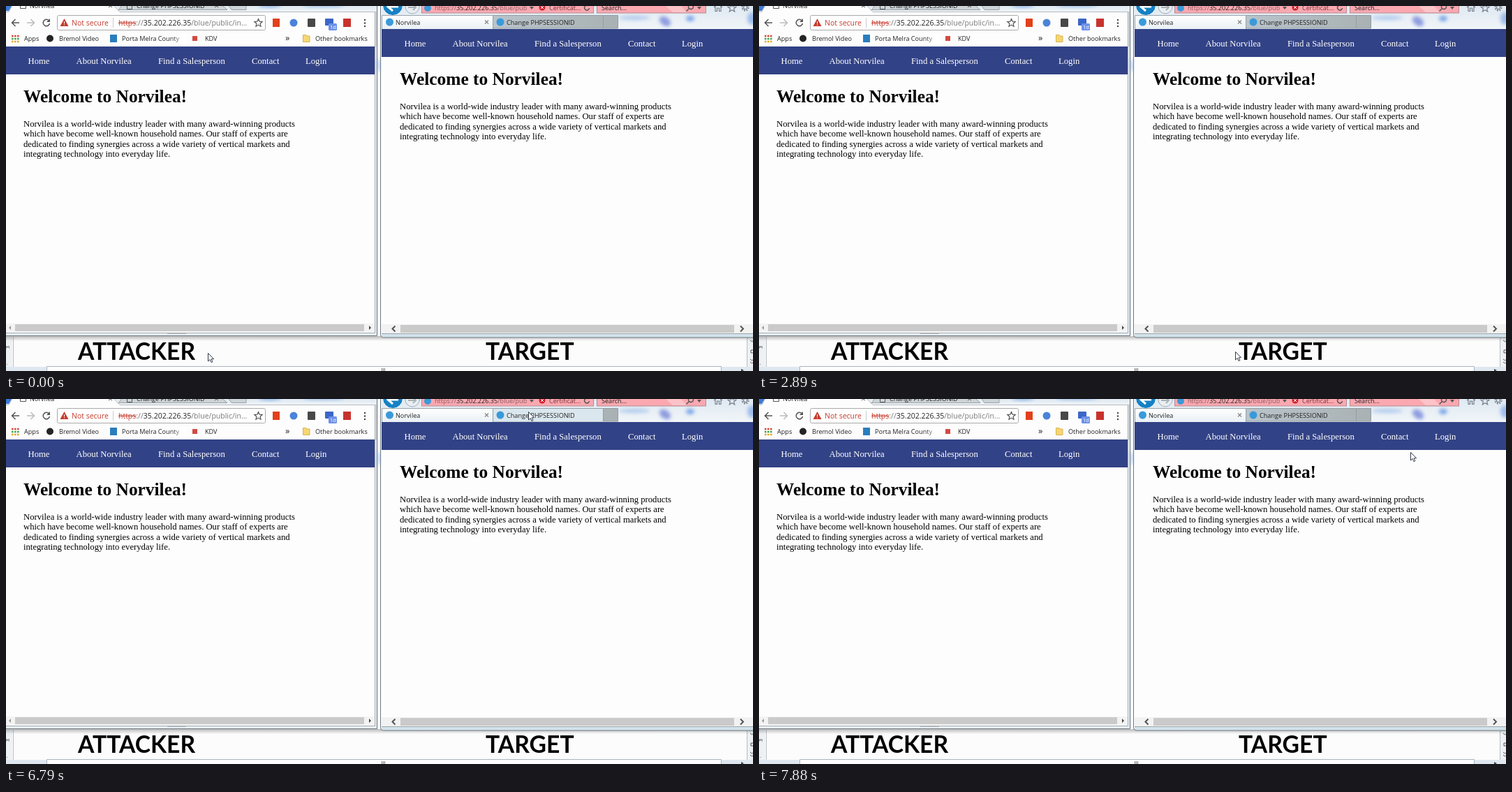
Recreate the animation shown at these times as an HTML page. Size 1070 by 523 pixels, loop 8 s.

```html
<!DOCTYPE html>
<html lang="en">
<head>
<meta charset="utf-8">
<title>Two browsers</title>
<style>
html, body { margin: 0; width: 100%; height: 100%; overflow: hidden; background: #fdfdfd; }
svg { display: block; width: 1070px; height: 523px; }
text { white-space: pre; }
.ui { font: 9.1px "Open Sans", "Noto Sans", sans-serif; fill: #222; }
.url { font-size: 10.5px; }
.page { font: 12.68px "Liberation Serif", "Noto Serif", serif; fill: #000; }
.page .nav { fill: #fff; }
.page .title { font-size: 25.4px; font-weight: bold; }
.label { font: bold 33.7px Lato, "Open Sans", sans-serif; fill: #000; }
.line { fill: none; stroke: #555; stroke-width: 1.5; }
.edge { fill: none; }
.bar { fill: #324286; }

#pointer, #arrow, #beam, #tip, #hover { animation: 8s step-end infinite; }
#pointer { animation-name: move; }
#arrow { animation-name: arrow; }
#beam { animation-name: beam; }
#tip { animation-name: tip; }
#hover { animation-name: hover; }

@keyframes move {
  0% { transform: translate(289px, 497px); }
  9.375% { transform: translate(288px, 497px); }
  13.25% { transform: translate(288px, 496px); }
  17% { transform: translate(322px, 494px); }
  18.625% { transform: translate(361px, 492px); }
  20.5% { transform: translate(414px, 489px); }
  22% { transform: translate(471px, 494px); }
  23.875% { transform: translate(545px, 502px); }
  25.375% { transform: translate(615px, 504px); }
  27% { transform: translate(665px, 499px); }
  28.875% { transform: translate(670px, 496px); }
  30.875% { transform: translate(674px, 494px); }
  32.75% { transform: translate(678px, 494px); }
  34.25% { transform: translate(681px, 494px); }
  36.125% { transform: translate(682px, 495px); }
  67.375% { transform: translate(681px, 488px); }
  69.125% { transform: translate(689px, 440px); }
  70.75% { transform: translate(703px, 368px); }
  72.625% { transform: translate(713px, 292px); }
  74.125% { transform: translate(721px, 215px); }
  75.625% { transform: translate(729px, 151px); }
  77.625% { transform: translate(739px, 113px); }
  79.5% { transform: translate(746px, 72px); }
  81.5% { transform: translate(749px, 50px); }
  83% { transform: translate(750px, 30px); }
  84.875% { transform: translate(748px, 18px); }
  88.625% { transform: translate(730px, 18px); }
  90.125% { transform: translate(675px, 21px); }
  91.625% { transform: translate(641px, 42px); }
  93.5% { transform: translate(685px, 76px); }
  95.125% { transform: translate(770px, 94px); }
  96.625% { transform: translate(869px, 83px); }
  98.5%, 100% { transform: translate(933px, 76px); }
}
@keyframes arrow { 0%, 79.5%, 100% { opacity: 1; } 75.625% { opacity: 0; } }
@keyframes beam { 0%, 79.5%, 100% { opacity: 0; } 75.625% { opacity: 1; } }
@keyframes hover { 0%, 90.125%, 100% { opacity: 0; } 84.875% { opacity: 1; } }
@keyframes tip {
  0%, 93.5%, 100% { opacity: 0; }
  88.625%, 90.125% { opacity: 1; }
  91.625% { opacity: .5; }
}
</style>
</head>
<body>
<svg viewBox="0 0 1070 523">
  <defs>
    <linearGradient id="glass" x2="0" y2="1">
      <stop offset="0" stop-color="#dfe9f2"/><stop offset="1" stop-color="#f1f5f8"/>
    </linearGradient>
    <linearGradient id="tab" x2="0" y2="1">
      <stop offset="0" stop-color="#fff"/><stop offset="1" stop-color="#e9f0f5"/>
    </linearGradient>
    <linearGradient id="dim">
      <stop offset="0" stop-color="#b9c4cb"/><stop offset="1" stop-color="#a9b1b3"/>
    </linearGradient>
    <linearGradient id="shade" x2="0" y2="1">
      <stop offset="0" stop-color="#555" stop-opacity=".4"/><stop offset="1" stop-color="#555" stop-opacity="0"/>
    </linearGradient>
    <linearGradient id="fade">
      <stop offset="0" stop-color="#fff" stop-opacity="0"/><stop offset="1" stop-color="#fff"/>
    </linearGradient>
    <filter id="soft" x="-50%" y="-50%" width="200%" height="200%"><feGaussianBlur stdDeviation="2.5"/></filter>
    <clipPath id="stage"><rect width="1070" height="523"/></clipPath>
    <g id="page" class="page">
      <g class="nav">
        <text x="31.5" y="83">Home</text>
        <text x="100.5" y="83">About Norvilea</text>
        <text x="218" y="83">Find a Salesperson</text>
        <text x="352" y="83">Contact</text>
        <text x="429" y="83">Login</text>
      </g>
      <text class="title" x="25" y="138">Welcome to Norvilea!</text>
      <text x="25" y="173">Norvilea is a world-wide industry leader with many award-winning products</text>
      <text x="25" y="187.3">which have become well-known household names. Our staff of experts are</text>
      <text x="25" y="201.6">dedicated to finding synergies across a wide variety of vertical markets and</text>
      <text x="25" y="216">integrating technology into everyday life.</text>
    </g>
  </defs>

  <g clip-path="url(#stage)">
  <!-- document behind the windows -->
  <rect width="1070" height="523" fill="#fcfcfc"/>
  <path fill="#eef1f4" d="M0 474H9V523H0ZM1062 474H1070V523H1062Z"/>
  <path class="edge" stroke="#b8bcc2" d="M10.500 474V517M1061.500 474V517"/>
  <rect y="473" width="1070" height="7" fill="url(#shade)"/>
  <g class="ui" style="font-size:7px"><text transform="translate(5 491) rotate(-90)">3</text><text x="1" y="516">·</text></g>
  <path class="line" style="stroke-width:1" d="M1066 479l2.500 2 2.500-2M1066 506l2.500 2 2.500-2M1066 510l2.500 2 2.500-2M1067 493h4v4h-4Z"/>
  <rect y="517" width="1070" height="6" fill="#dfe8f0"/>
  <path fill="#fdfdfd" stroke="#aab4bf" d="M58.500 524V516.500H1024.500V524"/>
  <path class="edge" stroke="#777" d="M538.500 519v4M540.500 519v4M542.500 519v4"/>
  <path fill="#444" d="M1053 520l4 2-4 2Z"/>
  <text class="label" x="103" y="507">ATTACKER</text>
  <text class="label" x="687" y="507">TARGET</text>

  <!-- left window -->
  <rect width="533" height="472" fill="#e6edf3"/>
  <rect width="530" height="9" fill="url(#glass)"/>
  <g filter="url(#soft)" fill="#8cb3e8"><ellipse cx="378" cy="-1" rx="16" ry="3"/><ellipse cx="455" cy="-1" rx="30" ry="2"/></g>
  <path fill="#cdd3d6" stroke="#9aa3a8" d="M160 7.500L168 -4H306L317 5.500H160M318 -2L323 5.500H344V-2Z"/>
  <path fill="#fdfdfd" stroke="#b5bbc0" d="M-2 8.500H4L10 -3H152L163 8.500H530V58H-2Z"/>
  <path fill="#3d7ad8" d="M0 0H8L4 7H0Z"/>
  <path class="line" style="stroke-width:1" d="M20.500 -3V3.500H28.500V-3M173.500 -3V4.500H180.500V-3M147 -2l5 4M152 -2l-5 4M299 -2l5 4M304 -2l-5 4"/>
  <text class="ui" x="34" y="2.500">Norvilea</text>
  <text class="ui" x="187" y="2.500">Change PHPSESSIONID</text>

  <rect y="9" width="528" height="460" fill="#fdfdfd"/>
  <path class="line" d="M19 24H8.500M13.500 19L8.500 24l5 5"/>
  <path class="line" style="stroke:#bbb" d="M30 24H40.500M35.500 19l5 5-5 5"/>
  <path class="line" d="M61.500 21A4.700 4.700 0 1 0 62.500 25"/><path fill="#555" d="M63 18v5h-5Z"/>
  <rect x="73.500" y="13.500" width="298" height="21" rx="2" fill="#fff" stroke="#aaa"/>
  <path fill="#c53b2d" d="M83.500 18L89.500 29H77.500Z"/><path class="edge" stroke="#fff" d="M83.500 22v3.500M83.500 26.500v1.200"/>
  <text class="ui url" x="94" y="28" style="fill:#c53b2d">Not secure</text>
  <path class="edge" stroke="#ccc" d="M153.500 17V31"/>
  <text class="ui url" x="161" y="28" style="fill:#777"><tspan fill="#c53b2d" text-decoration="line-through">https</tspan>://<tspan fill="#222">35.202.226.35</tspan>/blue/public/in...</text>
  <path class="line" style="stroke-width:1.200" d="M361.500 18.500l1.600 3.700 4 .3-3 2.700.9 4-3.500-2.100-3.500 2.100.9-4-3-2.700 4-.3Z"/>
  <rect x="382" y="18" width="10" height="12" fill="#e2401b"/>
  <circle cx="412" cy="24" r="5.500" fill="#4a83d8"/>
  <rect x="432" y="18" width="11" height="12" rx="1" fill="#484848"/>
  <rect x="457" y="18" width="12" height="10" rx="1" fill="#3b66c9"/>
  <rect x="462" y="25" width="12" height="10" rx="1.500" fill="#6d91ea"/>
  <text class="ui" x="464" y="32.500" style="font-size:7.500px;fill:#fff">1d</text>
  <rect x="483" y="18" width="11" height="12" fill="#c8322d"/>
  <g fill="#444"><circle cx="514" cy="20" r="1.200"/><circle cx="514" cy="24.500" r="1.200"/><circle cx="514" cy="29" r="1.200"/></g>

  <g class="edge" stroke-width="2.600" stroke-dasharray="2.600 1.400">
    <path stroke="#d94a38" d="M8 43H19"/><path stroke="#48a352" d="M8 47H19"/><path stroke="#e5a92e" d="M8 51H19"/>
  </g>
  <circle cx="63" cy="46.500" r="5" fill="#242424"/>
  <rect x="149" y="41" width="10" height="11" fill="#2a7dbd"/>
  <rect x="267" y="43" width="7" height="7" fill="#d14b43"/>
  <path fill="#f5d673" stroke="#d9b452" d="M425.500 41.500H430l1 1.500h4V51.500H425.500Z"/>
  <g class="ui">
    <text x="26" y="50">Apps</text>
    <text x="76" y="50">Bremol Video</text>
    <text x="166" y="50">Porta Melra County</text>
    <text x="285" y="50">KDV</text>
    <text x="400" y="50" style="font-size:13px">»</text>
    <text x="443" y="50">Other bookmarks</text>
  </g>
  <rect x="238" y="40" width="20" height="14" fill="url(#fade)"/>
  <rect class="bar" y="58" width="528" height="40"/>
  <rect y="455" width="528" height="12" fill="#f3f3f3"/>
  <rect x="13" y="456" width="500" height="10" fill="#cacaca"/>
  <path fill="#999" d="M7 458v6l-3-3Z"/><path fill="#444" d="M520 458v6l3-3Z"/>
  <path class="edge" stroke="#a6aeb5" d="M0 468.500H528.500V9"/>
  <path class="edge" stroke="#737b82" d="M0 472.500H531.500V0"/>
  <path class="edge" stroke="#bbb" d="M231 469.500H258"/>

  <!-- right window -->
  <path fill="#d3e2eb" stroke="#6f7a82" d="M536.500 -1V471q0 4 4 4H1071V-1Z"/>
  <path class="edge" stroke="#f8fbfd" d="M537.500 0V472"/>
  <rect x="538" width="532" height="33" fill="url(#glass)"/>
  <g filter="url(#soft)" fill="#7da7e8">
    <ellipse cx="944" cy="22" rx="9" ry="6" transform="rotate(35 944 22)" fill="#8f9de0"/>
    <ellipse cx="980" cy="18" rx="6" ry="4"/>
    <ellipse cx="900" cy="17" rx="22" ry="3" opacity=".5"/>
    <ellipse cx="1068" cy="18" rx="6" ry="9" opacity=".7"/>
    <ellipse cx="534" cy="85" rx="2" ry="10" opacity=".6"/>
  </g>
  <circle cx="554" cy="-1" r="14.500" fill="#1681c4" stroke="#fff"/>
  <path fill="none" stroke="#fff" stroke-width="3" d="M562 1H548M554 -6L547 1l7 6"/>
  <circle cx="582" cy="1" r="10" fill="#e9eef2" stroke="#a4adb5"/>
  <path fill="none" stroke="#a9b1b8" stroke-width="2" d="M576 2H587M583 -2l4 4-4 4"/>
  <rect x="595.500" y="-5" width="246" height="15" fill="#fba8b0" stroke="#b58a92"/>
  <rect x="846.500" y="-5" width="156" height="15" fill="#fba8b0" stroke="#b58a92"/>
  <path fill="#fcc3c8" d="M945 0H967L975 9H955Z"/>
  <circle cx="604" cy="3" r="5" fill="#3a9ad9"/>
  <g class="ui">
    <text x="614" y="6" style="fill:#8a5a60">https://<tspan fill="#222">35.202.226.35</tspan>/blue/pub</text>
    <text x="778" y="6" style="fill:#7c3038">Certificat...</text>
    <text x="853" y="6">Search...</text>
  </g>
  <path fill="#555" d="M750 1h6l-3 4ZM990 1h6l-3 4Z"/>
  <circle cx="768" cy="2" r="4.500" fill="#d3222d"/><path class="edge" stroke="#fff" d="M766 0l4 4M770 0l-4 4"/>
  <path class="line" d="M834.500 0A3.500 3.500 0 1 0 835.500 3M978 4l-3.500 3.500"/>
  <circle class="line" cx="981" cy="1" r="3.500"/>
  <g class="line" style="stroke:#77818b;stroke-width:1.200">
    <path d="M1014 2L1020 -3l6 5M1016 1V7.500H1018.500V3H1021.500V7.500H1024V1M1040 -3l1.500 4 4.500.3-3.500 2.700 1.200 4-3.700-2.300-3.700 2.300 1.200-4-3.500-2.700 4.500-.3Z"/>
    <circle cx="1059" cy="2" r="4.500" stroke-dasharray="2 1.500" stroke-width="2"/><circle cx="1059" cy="2" r="2.500"/>
  </g>
  <path fill="url(#dim)" stroke="#929ca4" d="M697.500 32V13.500H855.500V32ZM855.500 32V13.500H876.500V32Z"/>
  <rect id="hover" x="698" y="14" width="157" height="18" fill="#dbe7ee"/>
  <path fill="url(#tab)" stroke="#98a3ab" d="M538.500 33V13.500H697.500V33"/>
  <circle cx="549.500" cy="23" r="5.500" fill="#3a9ad9"/><circle cx="708" cy="23" r="5.500" fill="#3a9ad9"/>
  <text class="ui" x="558" y="27">Norvilea</text>
  <text class="ui" x="717" y="27">Change PHPSESSIONID</text>
  <path class="edge" stroke="#888" stroke-width="1.300" d="M686 20.500l5 5M691 20.500l-5 5"/>

  <rect x="538" y="33" width="532" height="437" fill="#fdfdfd"/>
  <rect class="bar" x="538" y="33" width="532" height="40"/>
  <g id="tip">
    <rect x="743" y="40" width="293" height="26" fill="#1d2958" opacity=".45"/>
    <rect x="740.500" y="37.500" width="292" height="26" fill="#46538c" stroke="#2b3769"/>
    <g class="ui" style="fill:#28335f">
      <text x="744" y="47">Change PHPSESSIONID</text>
      <text x="744" y="59">https://35.202.226.35/blue/public/hacktools/change_session_id.php</text>
    </g>
  </g>
  <rect x="538" y="456" width="532" height="13" fill="#f2f2f2"/>
  <rect x="565" y="457" width="478" height="11" fill="#cacaca"/>
  <path class="line" style="stroke-width:2" d="M557.500 458.500l-4 4 4 4M1052 458.500l4 4-4 4"/>
  <path class="edge" stroke="#9ba6ae" d="M538 469.500H1070"/>

  <use href="#page"/>
  <use href="#page" x="539" y="-25"/>

  <g id="pointer">
    <path id="arrow" fill="#fff" stroke="#333a48" d="M.5 .5V12L3.200 9.500 5 13.600 6.900 12.800 5.100 8.800H8.600Z"/>
    <path id="beam" fill="none" stroke="#222" d="M-2.500 -5.500H-.5L0 -5 .5 -5.500H2.500M0 -5V5M-2.500 5.500H-.5L0 5 .5 5.500H2.500"/>
  </g>
  </g>
</svg>
</body>
</html>
```
